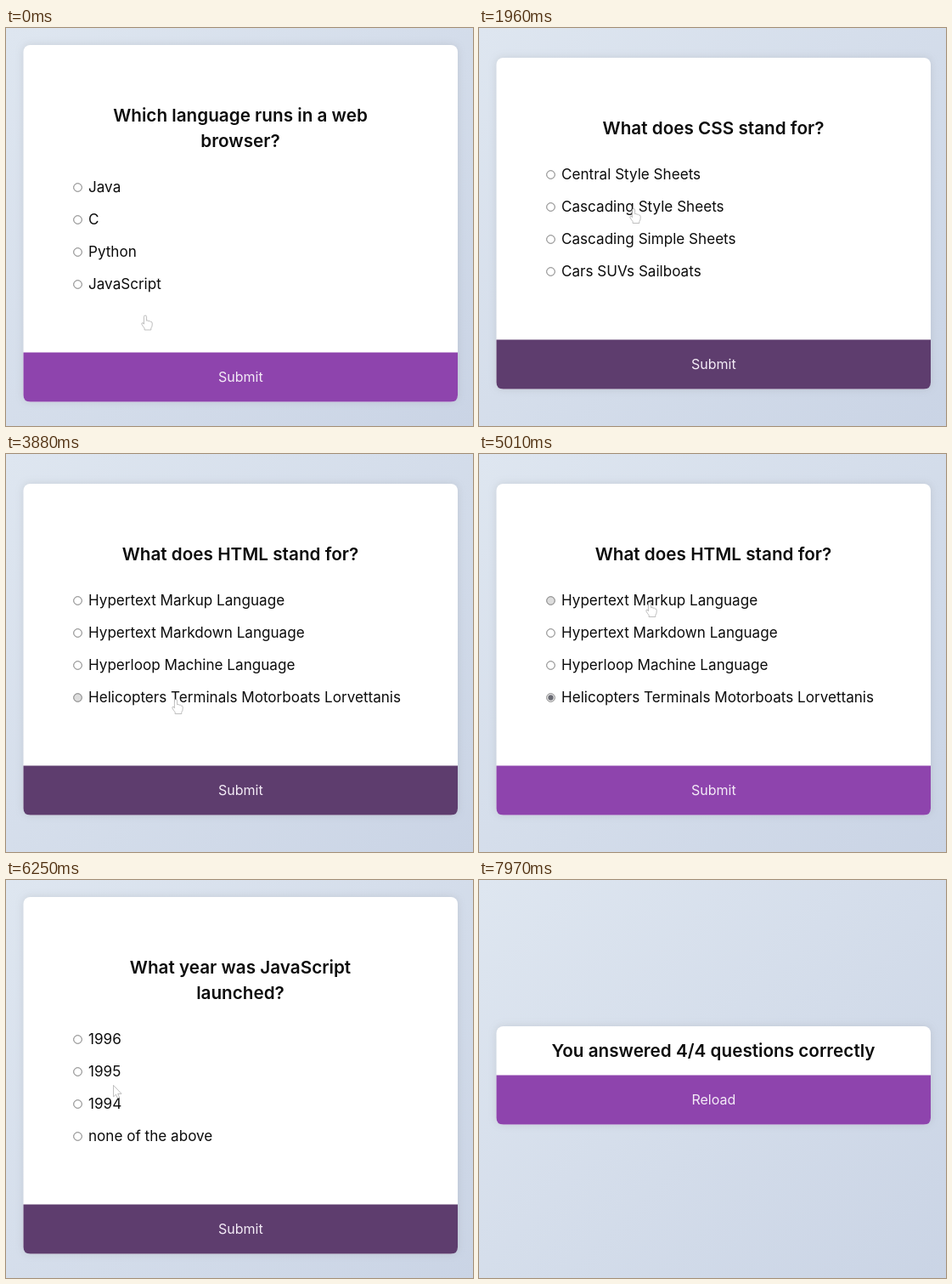
An HTML page that plays this animation: 550 by 468 pixels, repeating every 8380 ms.

```html
<!DOCTYPE html>
<html lang="en">
<head>
<meta charset="utf-8">
<title>Quiz</title>
<style>
  html, body { margin: 0; width: 100%; height: 100%; overflow: hidden; }
  body { background: linear-gradient(135deg, #dee6f0, #cad4e5); }
  svg { display: block; width: 550px; height: 468px; font: 17.1px Inter, sans-serif; fill: #0c0c0c; }
  .title { font-size: 20.7px; font-weight: 600; text-anchor: middle; }
  .action { font-size: 16px; text-anchor: middle; fill: #f4ecf7; }
  .card { fill: #fff; filter: drop-shadow(0 0 5px rgba(100, 100, 100, .17)); }
  .ring { fill: #fff; stroke: #767676; }
  .pressed { fill: #ddd; }
  .dot { fill: #696a72; }
  .pointer { fill: #fff; stroke: #a4a4a4; stroke-width: .7; stroke-linejoin: round; }
</style>
</head>
<body>
<svg viewBox="0 0 550 468">
  <g id="screen"></g>
  <path id="pointer" class="pointer"/>
</svg>
<script>
const LOOP = 8380;
const PRESS = 160;
const CENTER = 229.75;
const LINE = 30, ROW = 38, BUTTON = 58;
const COLORS = { idle: '#8e44ad', hover: '#732d91', focus: '#5e3d6e' };
const HAND = 'M-1.6 1.6a1.6 1.6 0 0 1 3.2 0V6.2q1.4-.8 2.4 .5q1.4-.6 2.3 .7q1.8-.3 1.9 1.6V11' +
  'q0 2.4-1.4 4V17H-.9V15q-1.5-1.6-3.2-4.6q-.5-1.7 1.1-1.8q.9 .2 1.4 1.6z';
const ARROW = 'M0 0V13.5L3 10.8L5 15.5L7.2 14.5L5.2 10H9.5z';

// Each move takes the pointer to an option (row), the button or off the stage
const screens = [
  { title: ['Which language runs in a web', 'browser?'],
    options: ['Java', 'C', 'Python', 'JavaScript'],
    moves: [{ from: 40, to: 500, x: 165, row: 3 }, { from: 680, to: 1040, x: 171 }], end: 1440 },
  { title: ['What does CSS stand for?'],
    options: ['Central Style Sheets', 'Cascading Style Sheets', 'Cascading Simple Sheets', 'Cars SUVs Sailboats'],
    moves: [{ from: 1440, to: 1760, x: 182, row: 1 }, { from: 2160, to: 2840, x: 205 }], end: 3200 },
  { title: ['What does HTML stand for?'],
    options: ['Hypertext Markup Language', 'Hypertext Markdown Language', 'Hyperloop Machine Language',
      'Helicopters Terminals Motorboats Lorvettanis'],
    moves: [{ from: 3200, to: 3860, x: 200, row: 3 }, { from: 4040, to: 4680, x: 201, row: 0 },
      { from: 5050, to: 5130, x: 202 }], end: 5730 },
  { title: ['What year was JavaScript', 'launched?'],
    options: ['1996', '1995', '1994', 'none of the above'],
    moves: [{ from: 5730, to: 6370, x: 119, row: 1 }, { from: 6450, to: 7010, x: 199 }], end: 7370 },
  { title: ['You answered 4/4 questions correctly'], options: [],
    moves: [{ from: 7370, to: 7970, x: 318, y: 475 }], end: LOOP }
];

for (const s of screens) {
  const extra = LINE * (s.title.length - 1);
  const height = s.options.length ? 389.5 + extra : 57.5 + BUTTON;
  s.top = CENTER - height / 2;
  s.bottom = CENTER + height / 2;
  s.button = s.bottom - BUTTON;
  s.titleY = s.top + (s.options.length ? 90 : 36);
  s.firstRow = s.top + 137.5 + extra;
  for (const m of s.moves) m.y ??= m.row === undefined ? s.button + 13.5 : s.firstRow + ROW * m.row + 2;
  // An option is held down just before the pointer leaves it
  s.picks = s.moves.slice(0, -1).map((m, i) => ({ row: m.row, at: s.moves[i + 1].from }));
}
const moves = screens.flatMap(s => s.moves);

const screenNode = document.getElementById('screen');
const pointerNode = document.getElementById('pointer');
const ease = u => u * u * (3 - 2 * u);
const text = (kind, x, y, s) => `<text class="${kind}" x="${x}" y="${y}">${s}</text>`;

function pointerAt(t) {
  let pos = { x: 164, y: 338 };
  for (const m of moves) {
    const k = ease(Math.min(1, Math.max(0, (t - m.from) / (m.to - m.from))));
    pos = { x: pos.x + (m.x - pos.x) * k, y: pos.y + (m.y - pos.y) * k };
  }
  return pos;
}

function option(label, y, checked, pressed) {
  return `<circle class="ring ${pressed ? 'pressed' : ''}" cx="84.5" cy="${y}" r="4.8"/>` +
    (checked ? `<circle class="dot" cx="84.5" cy="${y}" r="3.2"/>` : '') +
    text('', 97, y + 5.7, label);
}

function screenMarkup(s, t, color) {
  const picked = s.picks.filter(p => t >= p.at).at(-1)?.row;
  const pressed = s.picks.find(p => t >= p.at - PRESS && t < p.at)?.row;
  return `<rect class="card" x="20.5" y="${s.top}" width="511.5" height="${s.bottom - s.top}" rx="8"/>` +
    s.title.map((line, i) => text('title', 276, s.titleY + LINE * i, line)).join('') +
    s.options.map((label, i) => option(label, s.firstRow + ROW * i, i === picked, i === pressed)).join('') +
    `<path fill="${color}" d="M20.5 ${s.button}H532V${s.bottom - 8}q0 8-8 8H28.5q-8 0-8-8z"/>` +
    text('action', 276.3, s.button + 34.5, s.options.length ? 'Submit' : 'Reload');
}

// A pressed submit button keeps focus until the next option is picked
function buttonState(s, t, y) {
  if (!s.options.length) return 'idle';
  const unanswered = s !== screens[0] && t < s.picks[0].at;
  if (unanswered || t >= s.end - PRESS) return 'focus';
  return y > s.button ? 'hover' : 'idle';
}

// The hand turns into an arrow in the gaps between options
function pointerShape(s, y) {
  const offset = y - s.firstRow;
  const inGap = offset > 0 && offset < 3 * ROW && Math.abs(offset % ROW - ROW / 2) < 6;
  return inGap || !s.options.length ? ARROW : HAND;
}

let shown = '';
function draw(t) {
  const s = screens.find(q => t < q.end);
  const { x, y } = pointerAt(t);
  const markup = screenMarkup(s, t, COLORS[buttonState(s, t, y)]);
  if (markup !== shown) screenNode.innerHTML = shown = markup;
  pointerNode.setAttribute('d', pointerShape(s, y));
  pointerNode.setAttribute('transform', `translate(${x} ${y})`);
}

const origin = performance.now();
function tick() {
  draw((performance.now() - origin) % LOOP);
  requestAnimationFrame(tick);
}
tick();
</script>
</body>
</html>
```
